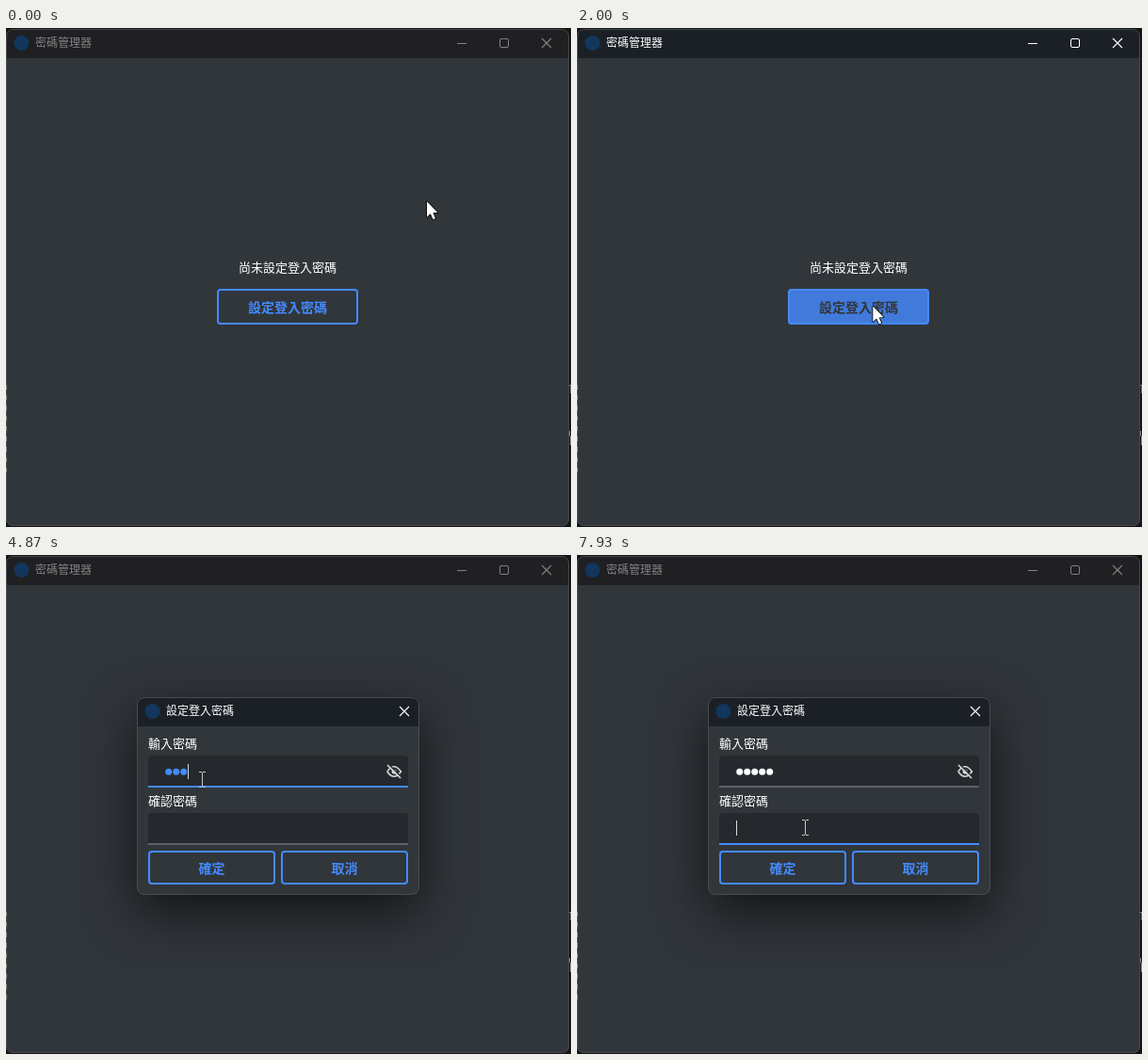
Write an HTML page with a canvas that moves like this. It is 600 px wide and 530 px high and loops after 8000 ms.

```html
<!DOCTYPE html>
<html lang="zh-Hant">
<head>
<meta charset="utf-8">
<title>密碼管理器</title>
<style>
html, body { margin: 0; width: 100%; height: 100%; overflow: hidden; background: #141414; }
canvas { display: block; width: 600px; height: 530px; }
</style>
</head>
<body>
<canvas id="stage" width="600" height="530"></canvas>
<script>
const ctx = document.getElementById('stage').getContext('2d');
const LOOP = 8000;
const BLUE = '#448aff', PANEL = '#31363b', FIELD = '#25292d', WHITE = '#ffffff', DIM = '#828284';
const FONT = '"Noto Sans CJK TC", "Noto Sans CJK SC", "Noto Sans CJK JP", "Noto Sans CJK", sans-serif';

const clamp = v => Math.max(0, Math.min(1, v));
const ease = p => p * p * (3 - 2 * p);
const lerp = (a, b, p) => a + (b - a) * p;

function rect(x, y, w, h, color) {
  ctx.fillStyle = color;
  ctx.fillRect(x, y, w, h);
}

function round(x, y, w, h, r, fill, stroke, width = 1) {
  ctx.beginPath();
  ctx.roundRect(x, y, w, h, r);
  if (fill) { ctx.fillStyle = fill; ctx.fill(); }
  if (stroke) { ctx.strokeStyle = stroke; ctx.lineWidth = width; ctx.stroke(); }
}

function text(str, x, cy, size, color, bold) {
  ctx.font = (bold ? 'bold ' : '') + size + 'px ' + FONT;
  ctx.fillStyle = color;
  ctx.fillText(str, x, Math.round(cy + size * 0.37));
}

function disc(x, y, r, color) {
  ctx.beginPath();
  ctx.arc(x, y, r, 0, Math.PI * 2);
  ctx.fillStyle = color;
  ctx.fill();
}

function line(points, color, width) {
  ctx.beginPath();
  points.forEach(([x, y], i) => i ? ctx.lineTo(x, y) : ctx.moveTo(x, y));
  ctx.strokeStyle = color;
  ctx.lineWidth = width;
  ctx.stroke();
}

function closeIcon(x, y, color) {
  line([[x - 5, y - 5], [x + 5, y + 5]], color, 1.1);
  line([[x + 5, y - 5], [x - 5, y + 5]], color, 1.1);
}

function button(x, y, w, h, label, fill, color) {
  round(x + 1, y + 1, w - 2, h - 2, 3, fill, BLUE, 2);
  text(label, x + (w - label.length * 14) / 2, y + h / 2 + 0.5, 14, color, true);
}

function backdrop() {
  rect(0, 0, 600, 530, '#141414');
  // Slivers of the desktop showing past the window edge
  rect(598, 379, 2, 1, '#8c8c8c');
  rect(599, 380, 1, 8, '#6c6c6c');
  rect(598, 428, 1, 5, '#8c8c8c');
  rect(599, 433, 1, 10, '#8c8c8c');
}

function mainWindow(active, tone) {
  const bar = `rgb(${lerp(32, 27, tone)},${lerp(31, 32, tone)},${lerp(34, 39, tone)})`;
  ctx.save();
  ctx.beginPath();
  ctx.roundRect(0, 1, 598, 528, 7);
  ctx.clip();
  rect(0, 0, 600, 32, bar);
  rect(0, 32, 600, 500, PANEL);
  ctx.restore();
  round(0.5, 1.5, 597, 527, 7, null, '#44474b');
  for (let y = 379; y < 468; y += 11) rect(0, y, 1, 5, '#858789');

  const color = active ? WHITE : DIM;
  disc(16.5, 16, 8, '#12365c');
  text('密碼管理器', 31, 15.5, 12, color);
  rect(479, 16, 10, 1, color);
  round(524.5, 11.5, 9, 9, 1.5, null, color);
  closeIcon(574, 16, color);
}

function startScreen(fill, color) {
  text('尚未設定登入密碼', 247, 254, 13, WHITE);
  button(224, 277, 150, 38, '設定登入密碼', fill, color);
}

function eye() {
  ctx.beginPath();
  ctx.moveTo(404.8, 230);
  ctx.quadraticCurveTo(412, 219.5, 419.4, 230);
  ctx.quadraticCurveTo(412, 240.5, 404.8, 230);
  ctx.strokeStyle = '#d3d6d8';
  ctx.lineWidth = 1.7;
  ctx.stroke();
  disc(412.2, 230, 2.6, '#d3d6d8');
  line([[406.5, 222.5], [420, 236]], FIELD, 1.6);
  line([[405, 223], [419, 237]], '#d3d6d8', 1.7);
}

function field(y, h, focused) {
  round(151, y, 276, h, [4, 4, 0, 0], FIELD);
  rect(151, y + h - 2, 276, 2, focused ? BLUE : '#5d6165');
}

function dialog(dots, caretX, second) {
  ctx.save();
  ctx.shadowColor = 'rgba(0,0,0,0.65)';
  ctx.shadowBlur = 56;
  ctx.shadowOffsetY = 18;
  round(139, 151, 300, 210, 8, PANEL);
  ctx.restore();
  round(139, 151, 300, 31, [8, 8, 0, 0], '#1b2026');
  round(139.5, 151.5, 299, 209, 7.5, null, '#484c50');

  disc(155.5, 166, 8, '#12365c');
  text('設定登入密碼', 170, 165.5, 12, WHITE);
  closeIcon(423, 166, WHITE);

  text('輸入密碼', 151, 200.5, 13, WHITE);
  field(213, 34, !second);
  text('確認密碼', 151, 261, 13, WHITE);
  field(274, 34, second);
  button(151, 314, 135, 36, '確定', null, BLUE);
  button(292, 314, 135, 36, '取消', null, BLUE);

  for (let i = 0; i < dots; i++) disc(172.7 + 8 * i, 230.3, 3.5, second ? WHITE : BLUE);
  if (dots) eye();
  if (caretX) rect(caretX, 222, 1, 16, '#d8dadc');
  if (second) rect(169, 282, 1, 16, '#d8dadc');
}

function arrow(x, y) {
  const shape = [[0, 0], [0, 16.5], [3.8, 13], [6.5, 19], [9, 17.9], [6.4, 12], [11.4, 11.8]];
  ctx.beginPath();
  shape.forEach(([dx, dy]) => ctx.lineTo(x + dx, y + dy));
  ctx.closePath();
  ctx.lineJoin = 'round';
  ctx.strokeStyle = '#000000';
  ctx.lineWidth = 1.6;
  ctx.stroke();
  ctx.fillStyle = WHITE;
  ctx.fill();
  ctx.lineJoin = 'miter';
}

function beam(x, y, overDots) {
  x = Math.round(x);
  y = Math.round(y);
  const color = '#c6c9cb';
  rect(x, y - 7, 1, 15, color);
  if (!overDots) rect(x - 3, y - 8, 3, 1, color);
  rect(x + 1, y - 8, 3, 1, color);
  rect(x - 3, y + 8, 3, 1, color);
  rect(x + 1, y + 8, 3, 1, color);
}

function drawStart(t, tick) {
  const active = t >= 800, pressed = t >= 1600;
  const move = ease(clamp((tick - 12) / 8));
  mainWindow(active, clamp((tick - 12) / 4));
  const fill = pressed ? '#417adb' : active ? 'rgba(68,138,255,0.2)' : null;
  startScreen(fill, pressed ? PANEL : BLUE);
  arrow(lerp(447, 314.3, move), lerp(t < 70 ? 184.3 : 183.3, 295.5, move));
}

function drawDialog(t, tick) {
  const dots = [4800, 4870, 6530, 6730].filter(k => t >= k).length;
  const count = dots && dots + 1;
  const caret = count && t < 6800 ? 169 + 8 * count : 0;
  mainWindow(false, 0);
  dialog(count, caret, tick >= 119);
  const nudge = clamp((tick - 58) / 2);
  const move = ease(clamp((tick - 115) / 4));
  const x = lerp(lerp(210, 208, nudge), 242, move);
  const y = lerp(lerp(236, 238, nudge), 289, move);
  beam(x, y, count === 5 && move === 0);
}

function draw(t) {
  const tick = Math.floor((t + 4) * 15 / 1000);
  backdrop();
  (t < 3470 ? drawStart : drawDialog)(t, tick);
}

const begin = performance.now();
function loop() {
  draw((performance.now() - begin) % LOOP);
  requestAnimationFrame(loop);
}
loop();
</script>
</body>
</html>
```
